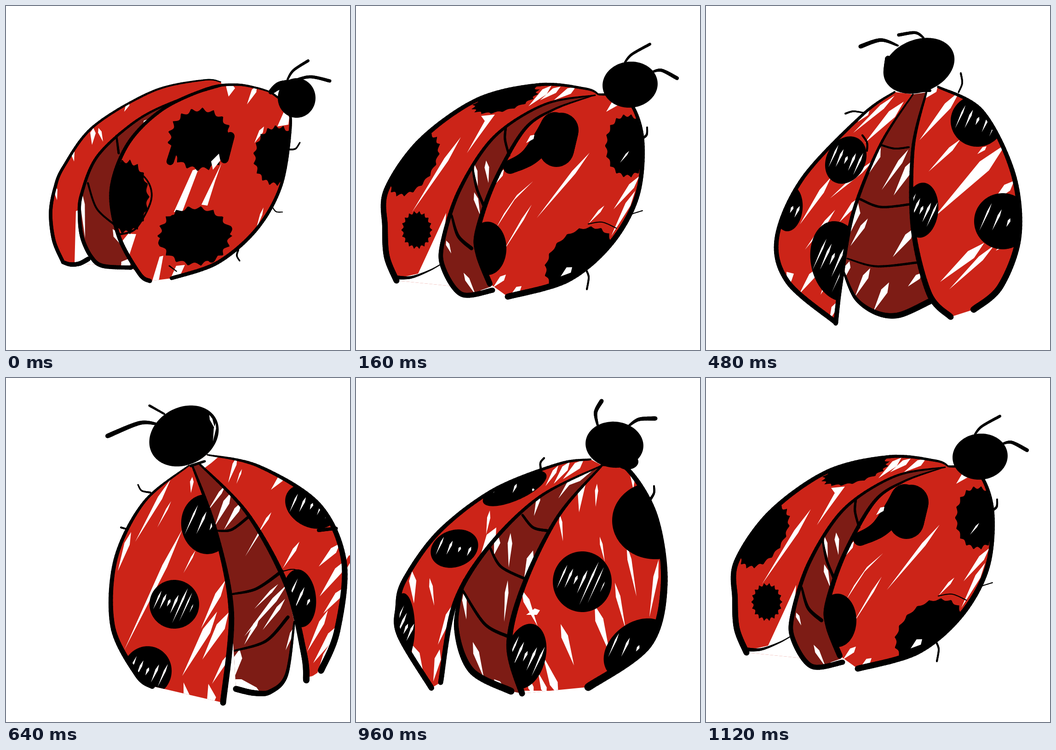
Recreate the animation shown at these times as an HTML page with a canvas. Size 748 by 748 pixels, loop 1.28 s.

```html
<!DOCTYPE html>
<html>
<head>
<meta charset="utf-8">
<title>Ladybug</title>
<style>
  html, body { margin: 0; width: 100%; height: 100%; overflow: hidden; background: #fff; }
  canvas { display: block; width: 748px; height: 748px; }
</style>
</head>
<body>
<canvas id="stage" width="748" height="748"></canvas>
<script>
const ctx = document.getElementById('stage').getContext('2d');
const STEP = 160, RED = '#cc2418', DARK = '#7d1c15';

function pairs(numbers) {
  const points = [];
  for (let i = 0; i < numbers.length; i += 2) points.push([numbers[i], numbers[i + 1]]);
  return points;
}

// Smooth curve through the given x, y pairs.
function smooth(numbers) {
  const points = pairs(numbers), last = points.length - 1, curve = [];
  const at = i => points[Math.max(0, Math.min(last, i))];
  for (let i = 0; i < last; i++) {
    const [a, b, c, d] = [at(i - 1), at(i), at(i + 1), at(i + 2)];
    for (let t = 0; t < 0.99; t += 1 / 16) {
      const s = 1 - t;
      curve.push([0, 1].map(j =>
        b[j] * s * s * (1 + 2 * t) + c[j] * t * t * (3 - 2 * t) +
        0.48 * t * s * ((c[j] - a[j]) * s - (d[j] - b[j]) * t)));
    }
  }
  curve.push(at(last));
  return curve;
}

const flip = numbers => pairs(numbers).reverse().flat();

function fill(points, color) {
  ctx.fillStyle = color;
  ctx.beginPath();
  points.forEach(p => ctx.lineTo(...p));
  ctx.closePath();
  ctx.fill();
}

const patch = (...numbers) => fill(pairs(numbers), '#fff');

// Fills the area between edges, then paints details clipped to it.
function panel(color, edges, paint) {
  ctx.save();
  fill(edges.flatMap(smooth), color);
  ctx.clip();
  paint();
  ctx.restore();
}

function ink(startWidth, endWidth, numbers) {
  const curve = smooth(numbers);
  ctx.lineCap = 'round';
  for (let i = 1; i < curve.length; i++) {
    ctx.lineWidth = startWidth + (endWidth - startWidth) * Math.sin(i / curve.length * Math.PI / 2);
    ctx.beginPath();
    ctx.moveTo(...curve[i - 1]);
    ctx.lineTo(...curve[i]);
    ctx.stroke();
  }
}

// Bare paper left between marker strokes.
function gap(x1, y1, x2, y2, width) {
  const dx = x2 - x1, dy = y2 - y1, half = width / 2 / Math.hypot(dx, dy);
  const x = x1 + dx * 0.3, y = y1 + dy * 0.3;
  patch(x1, y1, x - dy * half, y + dx * half, x2, y2, x + dy * half, y - dx * half);
}

function spot(x, y, rx, ry, tilt = 0, streaks = 0, bump = 0) {
  const points = [];
  for (let a = 0; a < 2 * Math.PI; a += 0.04) {
    const r = 1 - bump * Math.abs(Math.sin(a * 9));
    const u = rx * r * Math.cos(a), v = ry * r * Math.sin(a);
    points.push([x + u * Math.cos(tilt) - v * Math.sin(tilt), y + u * Math.sin(tilt) + v * Math.cos(tilt)]);
  }
  fill(points, '#000');
  for (let i = 0; i < streaks; i++) {
    const u = (2 * i + 1) / streaks - 1, reach = 0.8 * Math.sqrt(1 - u * u);
    const cx = x + u * rx * 0.8, cy = y + u * ry * 0.2, length = ry * reach * (0.6 + 0.4 * Math.sin(i * 5 + 1));
    gap(cx + length * 0.45, cy - length, cx - length * 0.45, cy + length, 4 + 2 * Math.sin(i * 7));
  }
}

function closed() {
  const back = [467, 165, 430, 161, 320, 185, 190, 262, 125, 350, 106, 397, 97, 450, 104, 510, 124, 557];
  const mid = [470, 173, 390, 198, 290, 245, 200, 325, 164, 410, 160, 460, 166, 505, 185, 545, 210, 565, 272, 569];
  const front = [575, 187, 545, 178, 500, 171, 440, 179, 340, 225, 265, 300, 229, 400, 245, 500, 290, 582, 313, 598];
  const side = [575, 187, 612, 220, 618, 270, 598, 390, 545, 485, 460, 558, 360, 592];
  panel(RED, [back, flip(mid)], () => {
    patch(152, 446, 166, 440, 190, 550, 280, 580, 149, 562);
    gap(190, 265, 187, 302, 12);
    gap(143, 310, 148, 338, 9);
    gap(201, 265, 211, 295, 8);
    gap(268, 208, 257, 230, 8);
    gap(106, 390, 111, 422, 9);
  });
  panel(DARK, [mid, flip(front)], () => {
    gap(232, 485, 258, 528, 14);
    gap(164, 400, 172, 505, 10);
    gap(309, 246, 298, 268, 14);
    gap(270, 290, 274, 308, 9);
    gap(250, 572, 278, 545, 22);
  });
  panel(RED, [front, flip(side)], () => {
    patch(406, 357, 419, 353, 383, 448, 365, 448);
    patch(469, 341, 455, 380, 438, 434, 425, 432);
    patch(334, 545, 342, 543, 331, 604, 316, 604);
    patch(370, 565, 389, 563, 375, 594, 358, 592);
    patch(266, 495, 283, 496, 268, 542, 252, 512);
    patch(606, 226, 616, 242, 614, 258, 590, 262);
    gap(490, 168, 484, 197, 20);
    gap(546, 172, 524, 214, 11);
    gap(561, 262, 540, 298, 9);
    gap(560, 438, 543, 488, 5);
    gap(465, 268, 457, 298, 6);
    spot(422, 290, 72, 70, -0.1, 0, 0.13);
    patch(446, 338, 463, 321, 466, 336, 450, 356);
    ink(16, 16, [382, 260, 357, 338]);
    ink(18, 18, [488, 283, 475, 333]);
    spot(588, 325, 51, 67, 0.1, 0, 0.12);
    spot(261, 415, 51, 83, 0, 0, 0.12);
    spot(410, 500, 82, 66, 0, 0, 0.12);
    ink(18, 16, [340, 515, 364, 462]);
    ink(16, 16, [484, 485, 447, 550]);
  });
  ink(3, 4, [245, 339, 302, 373, 316, 420, 283, 483, 246, 497]);
  ink(3, 2, [355, 565, 371, 577]);
  spot(632, 200, 41, 43);
  ink(10, 20, [576, 187, 595, 173, 625, 170]);
  ink(4, 6, [612, 160, 625, 140, 657, 119]);
  ink(4, 7, [611, 178, 620, 166, 660, 154, 704, 163]);
  ink(4, 3, [618, 312, 630, 310, 639, 297]);
  ink(2, 2, [578, 435, 587, 447, 601, 448]);
  ink(4, 3, [505, 530, 502, 543, 508, 554]);
  ink(2, 8, back);
  ink(8, 10, [124, 557, 140, 562, 160, 560, 179, 550]);
  ink(3, 9, mid);
  ink(3, 9, front);
  ink(4, 8, side);
  ink(4, 5, [240, 282, 245, 320]);
  ink(4, 4, [178, 385, 197, 440, 235, 475]);
}

function ajar() {
  const back = [527, 192, 500, 180, 400, 171, 265, 203, 140, 292, 66, 400, 63, 480, 67, 545, 88, 597];
  const mid = [520, 194, 410, 214, 300, 285, 225, 400, 188, 515, 190, 570, 230, 627, 297, 618];
  const front = [515, 195, 430, 225, 365, 270, 300, 385, 264, 490, 266, 540, 291, 604];
  const side = [527, 192, 590, 203, 622, 285, 612, 410, 555, 515, 460, 595, 330, 632];
  panel(RED, [back, flip(mid)], () => {
    patch(196, 450, 135, 582, 90, 592, 90, 640, 300, 640, 188, 560);
    patch(272, 239, 302, 236, 264, 288, 241, 320, 280, 250);
    gap(228, 285, 122, 448, 10);
    gap(425, 173, 375, 218, 14);
    gap(445, 175, 400, 205, 12);
    gap(478, 176, 430, 205, 14);
    spot(325, 203, 78, 25, -0.28, 0, 0.12);
    spot(126, 345, 43, 80, 0.6, 0, 0.1);
    spot(132, 487, 34, 42, 0, 0, 0.15);
  });
  panel(DARK, [mid, flip(front)], () => {
    gap(258, 345, 265, 392, 8);
    gap(283, 336, 288, 385, 10);
    gap(257, 405, 270, 455, 10);
    gap(234, 580, 260, 628, 10);
    gap(196, 510, 207, 538, 8);
    gap(265, 632, 300, 608, 16);
  });
  panel(RED, [front, flip(side)], () => {
    patch(385, 381, 345, 421, 304, 484, 322, 451, 350, 411);
    gap(382, 432, 318, 537, 5);
    gap(508, 319, 393, 461, 9);
    gap(616, 370, 560, 442, 13);
    gap(607, 402, 555, 500, 12);
    gap(582, 193, 544, 230, 20);
    gap(326, 584, 298, 612, 12);
    gap(360, 609, 335, 630, 12);
    gap(322, 355, 298, 393, 10);
    ink(76, 76, [446, 270, 436, 312]);
    ink(60, 30, [432, 260, 380, 325, 335, 350]);
    gap(388, 280, 370, 298, 10);
    spot(590, 304, 49, 70, 0, 0, 0.1);
    gap(594, 315, 574, 341, 4);
    spot(286, 527, 41, 58);
    spot(485, 550, 86, 59, -0.7, 0, 0.07);
    gap(470, 568, 445, 588, 15);
    gap(540, 434, 505, 474, 6);
  });
  ink(2, 2, [505, 474, 535, 470, 566, 483]);
  spot(596, 171, 60, 50, -0.1);
  ink(4, 6, [585, 122, 600, 105, 639, 83]);
  ink(4, 8, [645, 143, 665, 140, 698, 157]);
  ink(6, 4, [622, 288, 632, 280, 633, 264]);
  ink(2, 2, [600, 452, 623, 445]);
  ink(4, 4, [501, 575, 506, 590, 502, 616]);
  ink(3, 13, back);
  ink(9, 2, [85, 590, 120, 590, 160, 575, 187, 560]);
  ink(3, 11, mid);
  ink(2, 12, front);
  ink(4, 13, side);
  ink(5, 5, [326, 262, 324, 290, 333, 325]);
  ink(4, 6, [253, 350, 262, 395, 278, 435]);
  ink(4, 8, [208, 455, 222, 500, 251, 527]);
}

function lifted() {
  const back = [510, 177, 440, 187, 300, 243, 180, 335, 105, 440, 91, 500, 95, 560, 164, 674];
  const mid = [535, 190, 400, 258, 290, 365, 215, 490, 184, 662];
  const belly = [235, 440, 218, 540, 250, 635, 337, 681];
  const front = [535, 190, 440, 300, 365, 450, 333, 580, 361, 686];
  const side = [535, 188, 590, 198, 650, 300, 670, 450, 635, 580, 505, 672];
  panel(RED, [back, flip(mid)], () => {
    gap(440, 190, 412, 235, 9);
    gap(465, 182, 430, 230, 14);
    gap(495, 178, 450, 220, 16);
    gap(291, 288, 283, 340, 7);
    gap(305, 325, 268, 395, 22);
    gap(160, 435, 170, 495, 8);
    gap(212, 490, 178, 580, 14);
    gap(122, 420, 126, 490, 16);
    gap(122, 580, 148, 650, 18);
    gap(182, 590, 168, 660, 14);
    spot(345, 240, 75, 26, -0.42, 3);
    spot(214, 371, 53, 40, -0.35, 4);
    spot(103, 542, 25, 74, 0, 4);
  });
  panel(DARK, [mid.slice(0, 6), belly, flip(front)], () => {
    patch(530, 188, 487, 224, 455, 236, 480, 212);
    gap(336, 337, 332, 412, 10);
    gap(310, 345, 300, 385, 14);
    gap(400, 250, 387, 300, 9);
    gap(475, 210, 440, 262, 8);
    gap(234, 465, 240, 525, 10);
    gap(254, 574, 278, 652, 13);
    gap(330, 440, 322, 530, 8);
    gap(385, 375, 365, 440, 16);
    gap(300, 655, 330, 685, 12);
  });
  panel(RED, [front, flip(side)], () => {
    gap(492, 206, 485, 292, 18);
    gap(443, 296, 450, 355, 7);
    gap(524, 230, 521, 280, 7);
    gap(530, 345, 541, 400, 6);
    gap(588, 360, 610, 475, 9);
    gap(563, 445, 586, 545, 10);
    gap(519, 494, 552, 600, 18);
    gap(445, 535, 474, 625, 15);
    gap(400, 505, 370, 515, 15);
    gap(658, 395, 638, 520, 11);
    gap(601, 195, 603, 242, 12);
    gap(440, 690, 407, 605, 18);
    gap(414, 690, 396, 640, 13);
    gap(386, 690, 368, 635, 12);
    gap(360, 460, 395, 540, 14);
    patch(505, 675, 489, 680, 360, 680, 360, 700, 505, 700);
    spot(492, 443, 64, 66, 0, 7);
    spot(650, 310, 93, 84);
    spot(368, 605, 44, 72, 0.25, 5);
    spot(612, 590, 81, 58, -0.65, 5);
  });
  spot(562, 145, 63, 50, 0.1);
  spot(590, 182, 24, 17);
  ink(4, 9, [526, 105, 521, 75, 534, 50]);
  ink(4, 9, [592, 105, 615, 90, 651, 88]);
  ink(5, 4, [403, 205, 401, 185, 409, 174]);
  ink(6, 4, [640, 264, 648, 250, 648, 235]);
  ink(4, 12, back);
  ink(3, 11, mid);
  ink(5, 15, belly);
  ink(4, 13, front);
  ink(6, 17, side);
  ink(5, 6, [362, 298, 385, 325, 416, 332]);
  ink(5, 6, [292, 370, 315, 410, 368, 437]);
  ink(5, 7, [232, 462, 280, 535, 333, 563]);
}

function spread() {
  const back = [410, 187, 340, 237, 210, 375, 154, 505, 178, 600, 282, 688];
  const mid = [450, 192, 380, 300, 320, 450, 293, 600, 282, 690];
  const belly = [298, 575, 325, 635, 370, 667, 420, 672, 487, 642];
  const front = [479, 188, 450, 310, 450, 480, 485, 625, 532, 676];
  const side = [505, 176, 600, 228, 668, 365, 680, 500, 640, 610, 582, 660];
  panel(RED, [back, flip(mid)], () => {
    gap(410, 195, 320, 276, 11);
    gap(430, 208, 345, 298, 18);
    gap(356, 225, 330, 252, 12);
    gap(365, 335, 270, 418, 9);
    gap(272, 372, 204, 475, 11);
    gap(281, 443, 215, 530, 8);
    gap(335, 415, 290, 470, 12);
    gap(242, 570, 203, 626, 14);
    gap(266, 594, 249, 628, 7);
    gap(283, 645, 268, 684, 12);
    patch(175, 578, 191, 582, 186, 597, 176, 613);
    spot(304, 335, 42, 54, 0.5, 5);
    spot(180, 440, 30, 50, 0.1, 4);
    spot(288, 555, 60, 88, -0.2, 7);
  });
  panel(DARK, [mid.slice(0, 6), belly, flip(front)], () => {
    gap(447, 192, 405, 252, 9);
    gap(440, 312, 382, 400, 10);
    gap(380, 305, 350, 370, 18);
    gap(455, 330, 408, 412, 18);
    gap(330, 425, 310, 500, 24);
    gap(352, 462, 314, 522, 10);
    gap(454, 482, 406, 546, 15);
    gap(357, 570, 324, 632, 13);
    gap(398, 601, 364, 664, 15);
    gap(470, 580, 439, 610, 12);
    gap(312, 555, 300, 595, 12);
  });
  panel(RED, [front, flip(side)], () => {
    gap(552, 185, 464, 292, 16);
    gap(505, 170, 470, 205, 18);
    gap(553, 290, 484, 360, 10);
    gap(652, 300, 496, 459, 28);
    gap(670, 380, 620, 430, 18);
    gap(605, 515, 509, 600, 20);
    gap(627, 520, 529, 616, 12);
    gap(610, 305, 590, 322, 8);
    gap(682, 495, 630, 532, 18);
    spot(468, 444, 37, 60, 0.1, 5);
    spot(590, 250, 58, 56, 0, 5);
    spot(645, 468, 62, 61, 0, 4);
  });
  spot(463, 130, 80, 57, -0.38);
  ink(14, 6, [396, 115, 393, 150, 420, 181, 487, 184]);
  ink(4, 9, [417, 86, 380, 74, 336, 88]);
  ink(4, 7, [473, 69, 455, 58, 419, 63]);
  ink(3, 4, [342, 232, 320, 229, 303, 234]);
  ink(3, 4, [549, 188, 557, 168, 554, 146]);
  ink(4, 4, [350, 315, 350, 297, 340, 281]);
  ink(4, 11, back);
  ink(3, 10, mid);
  ink(4, 13, belly);
  ink(4, 13, front);
  ink(5, 14, side);
  ink(4, 4, [380, 302, 410, 310, 441, 307]);
  ink(5, 5, [335, 420, 380, 437, 445, 431]);
  ink(3, 5, [307, 549, 370, 566, 458, 558]);
}

function turned() {
  const back = [398, 190, 300, 270, 238, 395, 232, 540, 285, 645, 318, 670];
  const mid = [405, 190, 455, 330, 490, 510, 472, 706];
  const belly = [627, 530, 610, 645, 575, 682, 540, 685, 500, 676];
  const front = [420, 186, 525, 295, 610, 450, 648, 600, 653, 657];
  const side = [438, 167, 550, 192, 680, 275, 735, 400, 720, 550, 685, 636];
  panel(DARK, [mid.slice(0, 6), flip(belly), flip(front.slice(0, 6))], () => {
    gap(478, 232, 438, 290, 7);
    gap(490, 248, 454, 322, 14);
    gap(514, 268, 474, 330, 12);
    gap(562, 318, 520, 388, 4);
    gap(592, 448, 540, 502, 6);
    gap(612, 448, 518, 562, 11);
    gap(607, 480, 558, 548, 9);
    gap(552, 518, 518, 580, 9);
    gap(508, 590, 497, 650, 18);
    gap(627, 540, 608, 592, 8);
    patch(490, 655, 512, 655, 545, 673, 560, 695, 490, 690);
  });
  panel(RED, [back, flip(mid)], () => {
    gap(358, 220, 281, 356, 10);
    gap(359, 268, 329, 325, 4);
    gap(383, 330, 257, 592, 11);
    gap(405, 215, 402, 250, 8);
    gap(477, 440, 424, 545, 13);
    gap(459, 508, 383, 648, 18);
    gap(484, 510, 427, 612, 20);
    gap(487, 596, 448, 665, 10);
    gap(412, 375, 386, 424, 4);
    gap(272, 335, 243, 420, 12);
    gap(396, 705, 386, 662, 14);
    gap(450, 710, 440, 665, 20);
    spot(436, 318, 55, 65, -0.1, 4);
    spot(366, 492, 54, 53, 0, 7);
    spot(307, 638, 53, 55, 0.3, 5);
  });
  panel(RED, [front, flip(side)], () => {
    gap(503, 170, 483, 228, 9);
    gap(513, 198, 501, 230, 4);
    gap(605, 210, 576, 243, 13);
    gap(577, 292, 548, 338, 6);
    gap(638, 356, 602, 414, 8);
    gap(726, 360, 680, 410, 15);
    gap(740, 395, 682, 475, 17);
    gap(736, 455, 690, 512, 15);
    gap(700, 505, 655, 595, 12);
    gap(725, 535, 668, 620, 18);
    patch(715, 560, 690, 600, 676, 645, 652, 652, 656, 670, 700, 650);
    patch(435, 165, 466, 168, 446, 185, 430, 197, 422, 184);
    spot(664, 279, 60, 45, 0.5, 5);
    spot(638, 479, 36, 63, -0.1, 3);
  });
  ctx.strokeStyle = RED;
  ink(10, 10, [749, 390, 735, 414]);
  ctx.strokeStyle = '#000';
  spot(387, 126, 79, 62, -0.5);
  gap(442, 80, 455, 112, 6);
  gap(456, 98, 450, 138, 5);
  ink(5, 10, [328, 100, 290, 98, 221, 126]);
  ink(4, 5, [344, 78, 312, 60]);
  ink(4, 3, [314, 249, 295, 245, 287, 232]);
  ink(3, 4, [264, 329, 250, 325]);
  ink(6, 5, [402, 191, 432, 181]);
  ink(2, 2, [603, 420, 625, 416, 648, 425]);
  ink(3, 12, back);
  ink(4, 13, mid);
  ink(4, 13, belly);
  ink(4, 14, front);
  ink(3, 14, side);
  ink(8, 7, [680, 331, 718, 327]);
  ink(4, 6, [458, 332, 490, 330, 526, 303]);
  ink(4, 7, [492, 470, 545, 458, 600, 420]);
  ink(4, 7, [497, 593, 565, 572, 613, 520]);
}

const CYCLE = [closed, ajar, lifted, spread, turned, spread, lifted, ajar];
let shown;
function tick() {
  const pose = CYCLE[Math.floor(performance.now() / STEP) % CYCLE.length];
  if (pose !== shown) {
    ctx.fillStyle = '#fff';
    ctx.fillRect(0, 0, 748, 748);
    ctx.strokeStyle = '#000';
    pose();
    shown = pose;
  }
  requestAnimationFrame(tick);
}
tick();
</script>
</body>
</html>
```
